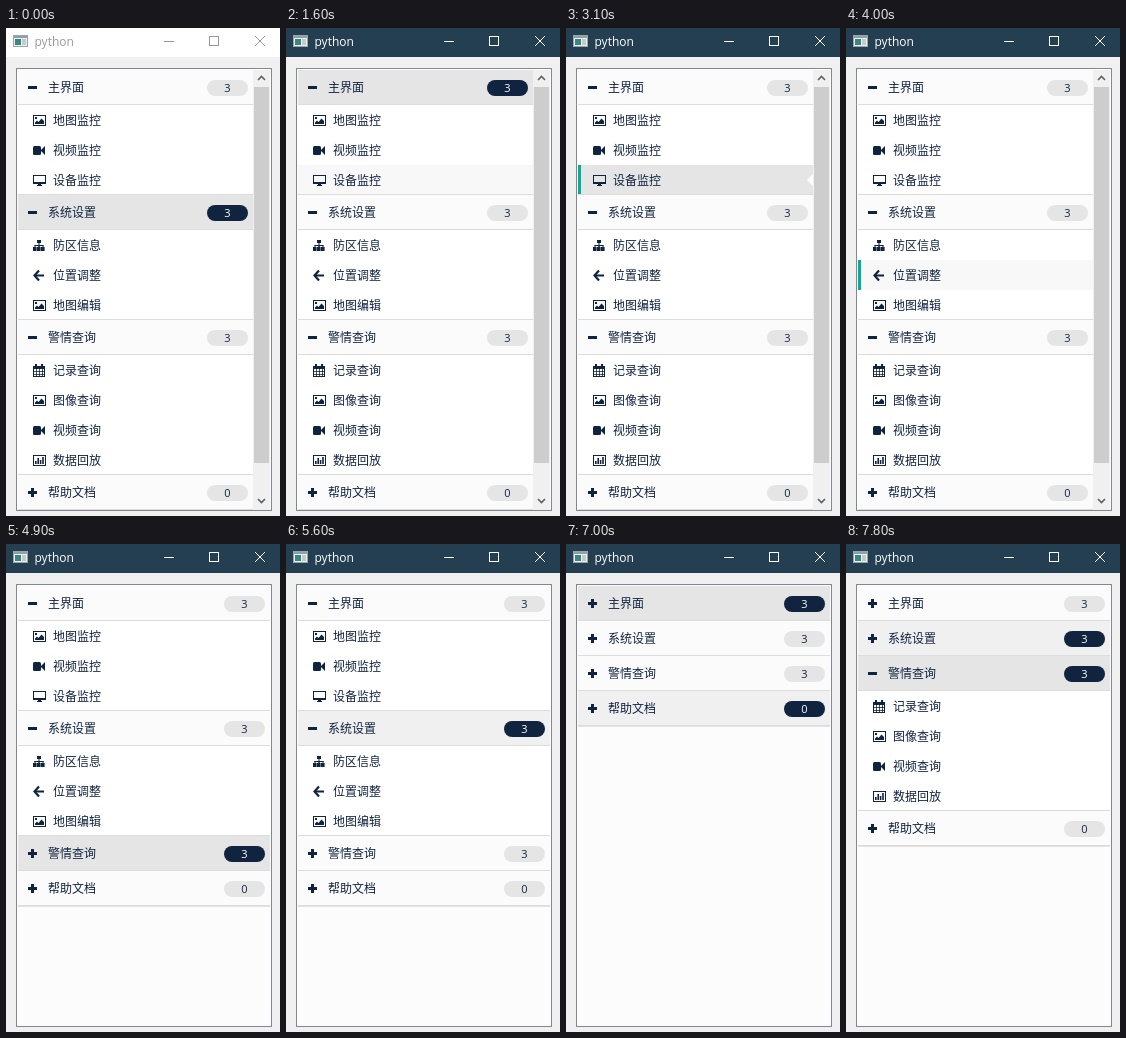
An HTML page with a canvas for the animation above (8 s loop, 274 px wide and 488 px high).

```html
<!DOCTYPE html>
<html lang="zh">
<head>
<meta charset="utf-8">
<title>python</title>
<style>
html, body { margin: 0; width: 100%; height: 100%; overflow: hidden; background: #f0f0f0; }
canvas { display: block; }
</style>
</head>
<body>
<canvas id="stage" width="274" height="488"></canvas>
<script>
const ctx = document.getElementById('stage').getContext('2d');
const LOOP = 8000;
const INK = '#10233f', TEAL = '#00ae9c', PICKED = '#e5e5e5';
const CJK = '"Noto Sans CJK SC", "Noto Sans CJK JP", "Noto Sans CJK", sans-serif';
const LATIN = '"Open Sans", "Noto Sans", sans-serif';

const menu = [
  { label: '主界面', count: 3, items: [['picture', '地图监控'], ['video', '视频监控'], ['desktop', '设备监控']] },
  { label: '系统设置', count: 3, items: [['sitemap', '防区信息'], ['back', '位置调整'], ['picture', '地图编辑']] },
  { label: '警情查询', count: 3, items: [['calendar', '记录查询'], ['picture', '图像查询'], ['video', '视频查询'], ['chart', '数据回放']] },
  { label: '帮助文档', count: 0, items: [] }
];

// Each entry changes part of the interface state; row ids are "section" or "section.item".
const timeline = [
  [0, { active: false, sel: '1', hover: '', faint: '', open: '012', stripe: true }],
  [500, { hover: '0.2', faint: '0.2' }],
  [700, { hover: '0.1' }],
  [800, { hover: '0' }],
  [1600, { active: true, sel: '0' }],
  [2000, { hover: '0.0' }],
  [2100, { hover: '0.1' }],
  [2300, { sel: '', hover: '0.0' }],
  [2400, { sel: '0.0' }],
  [2600, { hover: '0.1' }],
  [2800, { sel: '' }],
  [3000, { sel: '0.1', hover: '0.2', faint: '' }],
  [3100, { sel: '0.2' }],
  [3400, { hover: '1' }],
  [3500, { hover: '1.0' }],
  [3700, { hover: '1.1' }],
  [3900, { sel: '', hover: '2' }],
  [4000, { hover: '1.1' }],
  [4200, { sel: '1.1' }],
  [4400, { stripe: false }],
  [4500, { stripe: true }],
  [4900, { sel: '2', hover: '2', open: '01' }],
  [5200, { hover: '1.1' }],
  [5300, { hover: '1' }],
  [5600, { sel: '' }],
  [5800, { sel: '1', open: '0' }],
  [6000, { hover: '0.2', faint: '0.2' }],
  [6100, { hover: '0.1' }],
  [6200, { hover: '0' }],
  [6300, { sel: '0' }],
  [6500, { open: '', faint: '' }],
  [6700, { hover: '1' }],
  [6800, { hover: '2' }],
  [7000, { hover: '3' }],
  [7200, { sel: '3' }],
  [7400, { hover: '2' }],
  [7500, { sel: '' }],
  [7700, { sel: '2', open: '2' }],
  [7800, { hover: '1' }]
];

function stateAt(t) {
  const state = {};
  for (const [start, change] of timeline) if (start <= t) Object.assign(state, change);
  return state;
}

function box(color, x, y, w, h) {
  ctx.fillStyle = color;
  ctx.fillRect(x, y, w, h);
}

function path(color, points, width) {
  ctx.beginPath();
  points.forEach(([x, y]) => ctx.lineTo(x, y));
  if (width) {
    ctx.strokeStyle = color;
    ctx.lineWidth = width;
    ctx.stroke();
  } else {
    ctx.fillStyle = color;
    ctx.fill();
  }
}

function frame(color, x, y, w, h) {
  ctx.strokeStyle = color;
  ctx.lineWidth = 1;
  ctx.strokeRect(x + .5, y + .5, w - 1, h - 1);
}

function text(str, x, y, color, font, align = 'left') {
  ctx.fillStyle = color;
  ctx.font = font;
  ctx.textAlign = align;
  ctx.fillText(str, x, y);
}

// Icons are drawn in a 13 by 11 cell.
const icons = {
  picture() {
    frame(INK, 0, 0, 13, 11);
    box(INK, 2, 2, 2, 2);
    path(INK, [[2, 9], [2, 7.5], [4, 5.5], [5.5, 7], [8.5, 3.5], [11, 6], [11, 9]]);
  },
  video() {
    ctx.fillStyle = INK;
    ctx.beginPath();
    ctx.roundRect(0, 1, 8, 9, 1.5);
    ctx.fill();
    path(INK, [[8, 5], [12, 1], [12, 10], [8, 6]]);
  },
  desktop() {
    frame(INK, 0, 0, 13, 9);
    box(INK, 0, 7, 13, 2);
    box(INK, 5, 9, 3, 1);
    box(INK, 4, 10, 5, 1);
  },
  sitemap() {
    box(INK, 4, 0, 4, 3);
    box(INK, 5.5, 3, 1, 5);
    box(INK, 1.5, 5, 9, 1);
    for (const x of [0, 4, 8]) {
      box(INK, x + 1.5, 5, 1, 3);
      box(INK, x, 7, 3.6, 4);
    }
  },
  back() {
    path(INK, [[6, .5], [1.5, 5.5], [6, 10.5]], 2.2);
    box(INK, 2, 4.5, 9, 2);
  },
  calendar() {
    frame(INK, 0, 1, 12, 11);
    box(INK, 0, 1, 12, 3);
    box(INK, 2, -1, 2, 3);
    box(INK, 8, -1, 2, 3);
    for (const x of [3, 6, 9]) box(INK, x, 4, .8, 8);
    for (const y of [6, 9]) box(INK, 0, y, 12, .8);
  },
  chart() {
    frame(INK, 0, 0, 13, 11);
    [3, 6, 4, 7].forEach((h, i) => box(INK, 2 + i * 2.4, 9 - h, 1.6, h));
  }
};

function drawTitle(active) {
  const ink = active ? '#fff' : '#999';
  box(active ? '#243f51' : '#fff', 0, 0, 274, 29);
  box('#e9eeee', 7, 7, 15, 12);
  frame('#9aa5a8', 7, 7, 15, 12);
  box('#8fa0a8', 8, 8, 13, 2);
  box('#3d8580', 9, 11, 6, 6);
  box('#c3cccd', 16, 11, 4, 6);
  text('python', 28.5, 18, ink, '12px ' + LATIN);
  box(ink, 158, 13, 10, 1);
  frame(ink, 203, 8, 10, 10);
  path(ink, [[249, 8], [259, 18]], 1);
  path(ink, [[259, 8], [249, 18]], 1);
}

function drawHeader(section, id, y, right, state) {
  const picked = state.sel === id, lit = picked || state.hover === id;
  const cy = y + 18;
  box(picked ? PICKED : lit ? '#f0f0f0' : '#fbfbfb', 12, y, right - 12, 34);
  box('#dcdcdc', 12, y + 34, right - 12, 1);
  if (y > 42) box('#dcdcdc', 12, y - 1, right - 12, 1);

  box(INK, 22, cy - 2, 9, 3);
  if (!state.open.includes(id)) box(INK, 25, cy - 5, 3, 9);
  text(section.label, 42, cy + 4, INK, '12px ' + CJK);

  ctx.fillStyle = lit ? INK : PICKED;
  ctx.beginPath();
  ctx.roundRect(right - 46, cy - 8, 41, 16, 8);
  ctx.fill();
  text(section.count, right - 25.5, cy + 4, lit ? '#fff' : INK, '11px ' + LATIN, 'center');
}

function drawItem([icon, label], id, y, right, state) {
  const picked = state.sel === id, hovered = state.hover === id;
  const faint = hovered || state.faint === id;
  box(picked ? PICKED : faint ? '#f8f8f8' : '#fff', 12, y, right - 12, 30);
  if ((picked || hovered) && state.stripe) box(TEAL, 12, y, 3, 30);
  if (picked) path('#fff', [[right - 6, y + 15], [right, y + 9], [right, y + 21]]);
  ctx.save();
  ctx.translate(27, y + 10);
  icons[icon]();
  ctx.restore();
  text(label, 47, y + 20, INK, '12px ' + CJK);
}

function drawScrollbar() {
  box('#f0f0f0', 247, 42, 17, 440);
  box('#cdcdcd', 248, 59, 15, 376);
  path('#606060', [[252, 52], [255.5, 48.5], [259, 52]], 1.6);
  path('#606060', [[252, 471], [255.5, 474.5], [259, 471]], 1.6);
}

function draw(t) {
  const state = stateAt(t);
  const scrolls = state.open.length === 3;
  const right = scrolls ? 247 : 264;
  box('#f0f0f0', 0, 0, 274, 488);
  drawTitle(state.active);
  box('#fcfcfc', 10, 40, 256, 443);
  frame('#828790', 10, 40, 256, 443);

  let y = 42;
  menu.forEach((section, s) => {
    const id = String(s);
    drawHeader(section, id, y, right, state);
    y += 35;
    if (!state.open.includes(id)) return;
    section.items.forEach((item, i) => {
      drawItem(item, id + '.' + i, y, right, state);
      y += 30;
    });
  });
  if (scrolls) drawScrollbar();
  else box('#e4e4e4', 12, y, right - 12, 1);
}

const begin = performance.now();
function tick() {
  draw((performance.now() - begin) % LOOP);
  requestAnimationFrame(tick);
}
tick();
</script>
</body>
</html>
```
